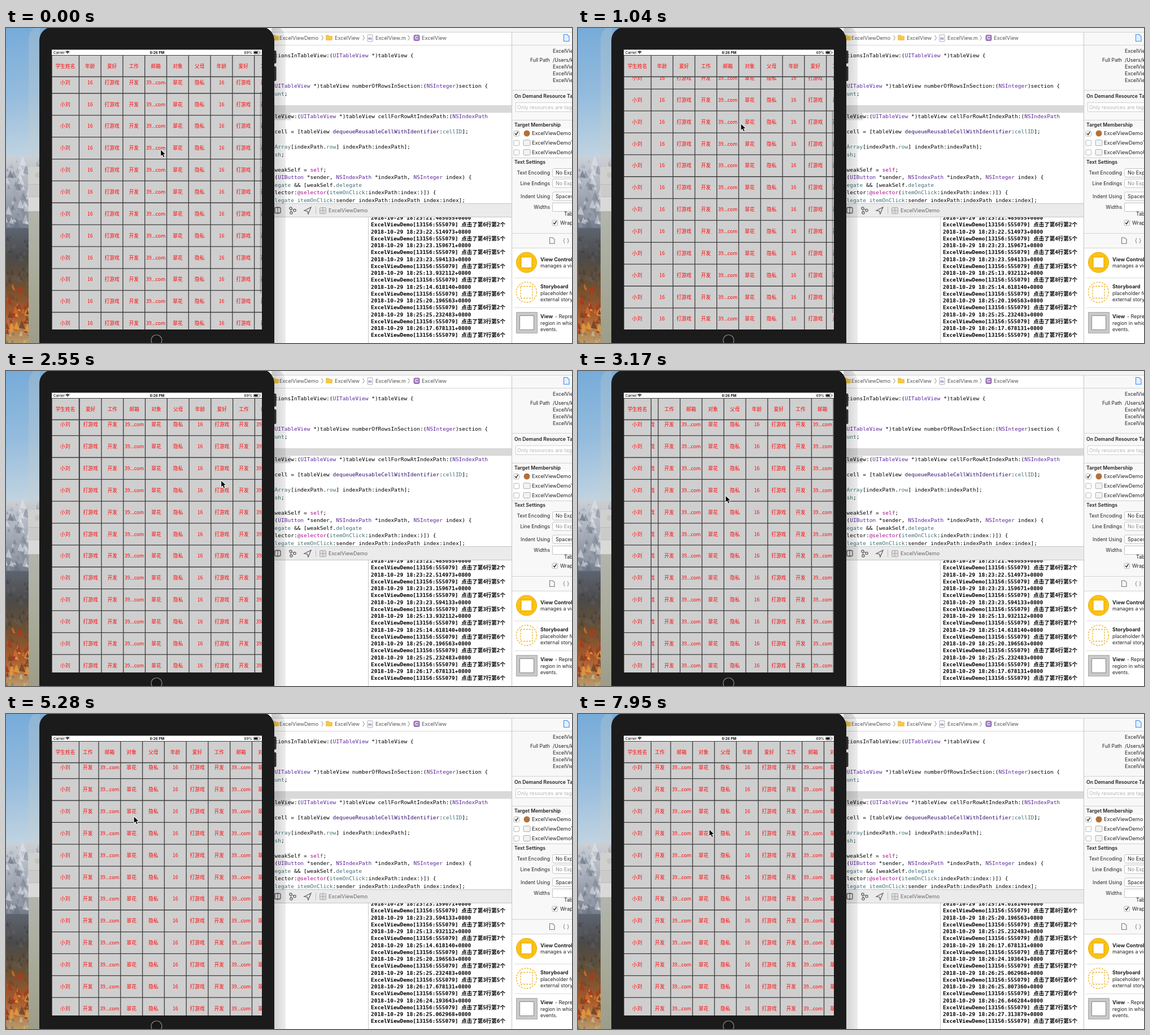
An HTML page with a canvas for the animation above (8000 ms loop, 1002 px wide and 559 px high).

```html
<!DOCTYPE html>
<html lang="en">
<head>
<meta charset="utf-8">
<title>Excel view demo</title>
<style>
html, body { margin: 0; width: 100%; height: 100%; overflow: hidden; background: #fff; }
canvas { display: block; width: 1002px; height: 559px; }
</style>
</head>
<body>
<canvas id="stage" width="1002" height="559"></canvas>
<script>
const ctx = document.getElementById('stage').getContext('2d');
const LOOP = 8000;
const SANS = 'Inter, sans-serif';
const CJK = '"Noto Sans CJK SC", sans-serif';
const MONO = '"DejaVu Sans Mono", "Noto Sans CJK SC", monospace';

// Each gesture starts where the last one ended; a click lands at its first step
const GESTURES = [
  { from: 140, to: 1040, x: 288, y: 169.5, sy: -46.5 },
  { from: 1220, to: 1810, x: 252, y: 188, sx: 13.3, sy: -40.2 },
  { from: 1960, to: 2160, x: 232, y: 191, sx: 38 },
  { from: 2370, to: 2550, x: 380.5, y: 194 },
  { from: 2730, to: 3170, x: 261, y: 221, sx: 65 },
  { from: 3350, to: 3350, sx: 81.7 },
  { from: 3500, to: 4090, x: 247, y: 138 },
  { from: 4380, to: 4830, x: 226, y: 181.5, click: true },
  { from: 5280, to: 5570, x: 224, y: 214, click: true },
  { from: 6020, to: 6460, x: 182, click: true },
  { from: 6760, to: 6910, y: 180, click: true },
  { from: 7510, to: 7950, x: 232, y: 204.5, click: true }];
const START = { x: 273.5, y: 215.5, sx: 0, sy: 0, clicks: 0 };

// time of a click, then its row and column
const LOG = ['18:23:21.485655 6 2', '18:23:22.514973 4 5', '18:23:23.159671 4 5',
  '18:23:23.594133 3 5', '18:25:13.932112 8 7', '18:25:14.618140 8 6', '18:25:20.196563 6 2',
  '18:25:25.232483 3 5', '18:26:17.678131 7 6', '18:26:24.193643 5 7', '18:26:25.062968 6 6',
  '18:26:25.807360 7 6', '18:26:26.646284 7 5', '18:26:27.313879 6 5'];

const COLUMNS = [['年龄', '16'], ['爱好', '打游戏'], ['工作', '开发'],
  ['邮箱', '39...com'], ['对象', '翠花'], ['父母', '隐私']];

const CODE = `tionsInTableView:(UITableView *)tableView {



UITableView *)tableView numberOfRowsInSection:(NSInteger)section {
unt;


leView:(UITableView *)tableView cellForRowAtIndexPath:(NSIndexPath

cell = [tableView dequeueReusableCellWithIdentifier:cellID];

Array[indexPath.row] indexPath:indexPath];
sh;

weakSelf = self;
(UIButton *sender, NSIndexPath *indexPath, NSInteger index) {
egate && [weakSelf.delegate
lector:@selector(itemOnClick:indexPath:index:)]) {
legate itemOnClick:sender indexPath:indexPath index:index];`.split('\n');
const SYNTAX = [
  [/^(UITableView|NSInteger|NSIndexPath|UIButton)$/, '#5c2699'],
  [/^(self|@selector)$/, '#aa0d91'],
  [/^dequeue/, '#2e0d6e'],
  [/^(cellID|Array|(de)?legate|egate|itemOnClick|row|unt|sh)$/, '#3f6e75']];
const colorOf = word => (SYNTAX.find(([rule]) => rule.test(word)) || [0, '#000'])[1];

function rect(x, y, w, h, color) { ctx.fillStyle = color; ctx.fillRect(x, y, w, h); }

function shape(path, fill, stroke, width = 1) {
  ctx.beginPath();
  path();
  if (fill) { ctx.fillStyle = fill; ctx.fill(); }
  if (stroke) { ctx.strokeStyle = stroke; ctx.lineWidth = width; ctx.stroke(); }
}
const round = (x, y, w, h, r, fill, stroke, width) =>
  shape(() => ctx.roundRect(x, y, w, h, r), fill, stroke, width);
const disc = (x, y, r, fill, stroke, width) =>
  shape(() => ctx.arc(x, y, r, 0, Math.PI * 2), fill, stroke, width);
const path = (points, stroke, width) =>
  shape(() => points.forEach(p => ctx.lineTo(...p)), null, stroke, width);
const poly = (points, fill, stroke, width) => shape(() => {
  points.forEach(p => ctx.lineTo(...p));
  ctx.closePath();
}, fill, stroke, width);
const hline = (x1, x2, y, color, width) => path([[x1, y], [x2, y]], color, width);
const vline = (x, y1, y2, color, width) => path([[x, y1], [x, y2]], color, width);

function gradient(x1, y1, x2, y2, ...colors) {
  const g = ctx.createLinearGradient(x1, y1, x2, y2);
  colors.forEach((c, i) => g.addColorStop(i / (colors.length - 1), c));
  return g;
}

// y is the optical middle of the line
function text(s, x, y, size, { color = '#222', family = SANS, weight = 400, align = 'left' } = {}) {
  ctx.font = `${weight} ${size}px ${family}`;
  ctx.fillStyle = color;
  ctx.textAlign = align;
  ctx.fillText(s, x, y + size * 0.36);
}

function clipped(x, y, w, h, draw) {
  ctx.save();
  ctx.beginPath();
  ctx.rect(x, y, w, h);
  ctx.clip();
  draw();
  ctx.restore();
}

// The screen refreshes about every 165 ms while a gesture lasts
function stateAt(t) {
  const state = { ...START };
  for (const g of GESTURES) {
    if (t < g.from) break;
    const steps = Math.round((g.to - g.from) / 165);
    const gap = (g.to - g.from) / steps;
    const done = steps ? Math.min(1, Math.floor((t - g.from) / gap + 1e-6) / steps) : 1;
    for (const key of ['x', 'y', 'sx', 'sy']) {
      if (key in g) state[key] += (g[key] - state[key]) * done;
    }
    if (g.click) state.clicks++;
  }
  return state;
}

function drawWallpaper() {
  let seed = 7;
  const random = () => (seed = seed * 16807 % 2147483647) / 2147483647;
  const scatter = (count, top, bottom, size, colors) => {
    for (let i = 0; i < count; i++) {
      const x = random() * 60, y = top + random() * (bottom - top), s = size * (.4 + random());
      poly([[x, y - s], [x + s * .8, y + s], [x - s * .6, y + s * .7]], colors[i % colors.length]);
    }
  };
  rect(0, 0, 80, 240, gradient(0, 0, 30, 235, '#76abd9', '#94bbdd', '#c3d5e1'));
  rect(0, 228, 80, 130, gradient(0, 228, 0, 358, '#ccd0d7', '#a5acb8', '#737b8a'));
  scatter(90, 236, 350, 7, ['rgba(232,234,238,.5)', 'rgba(96,104,122,.4)', 'rgba(160,164,175,.5)']);
  rect(0, 355, 80, 204, gradient(0, 355, 0, 559, '#5d6470', '#4b4a4a', '#6a5033', '#a8592a', '#b99a6a'));
  scatter(60, 365, 455, 5, ['rgba(100,98,98,.4)', 'rgba(50,54,54,.4)']);
  scatter(70, 458, 540, 6, ['#c8682a', '#d9953f', '#7a4a28', '#a53c20']);
  scatter(20, 540, 559, 4, ['#c9b084', '#8a7a62']);

  round(39.5, 246, 40, 79, [5, 0, 0, 0], '#dfdfdf');
  round(39.5, 246, 40, 31, [5, 0, 0, 0], '#d3d2d3');
  disc(56, 261, 5, '#c0bfc0');
  rect(40, 277, 20, 22, '#cccccc');
  hline(40, 60, 277.5, '#b4b4b4');
  hline(40, 60, 299.5, '#b4b4b4');
  rect(40, 325, 20, 234, gradient(0, 325, 0, 559, '#a9aca2', '#9c9d89', '#8c8a73'));
}

function folder(x) {
  round(x - 6, 12.5, 6, 4, 1, '#e9b93f');
  round(x - 6, 14, 12, 8, 1, '#f3c84e');
}
const chevron = x => path([[x - 1.5, 13], [x + 1.5, 17.5], [x - 1.5, 22]], '#888');

function drawEditor() {
  rect(470, 0, 426, 559, '#fff');
  rect(470, 0, 532, 7, '#f3f3f3');
  hline(470, 1002, 7.5, '#d2d2d2');
  hline(470, 895, 30.5, '#d6d6d6');
  const crumb = (s, x) => text(s, x, 17.5, 9.1, { color: '#555' });
  folder(477);
  crumb('ExcelViewDemo', 484);
  chevron(560);
  folder(572);
  crumb('ExcelView', 582);
  chevron(633);
  round(640, 12, 9, 12, 1, '#fff', '#aaa');
  text('m', 644.5, 18.5, 7, { color: '#7a4fb0', weight: 600, align: 'center' });
  crumb('ExcelView.m', 654);
  chevron(713);
  round(722, 12.5, 10, 10, 2, '#a983c4', '#8b62ab');
  text('C', 727, 17.5, 8, { color: '#fff', weight: 600, align: 'center' });
  crumb('ExcelView', 736);

  rect(470, 137, 425, 13.5, '#d9d9d9');
  rect(470, 150.5, 34, 13, '#dcdcdc');
  clipped(470, 31, 425, 280, () => {
    ctx.font = `9.5px ${MONO}`;
    ctx.textAlign = 'left';
    const advance = ctx.measureText('m').width;
    CODE.forEach((source, row) => {
      let x = 475.6;
      for (const word of source.split(/(@?\w+)/)) {
        ctx.fillStyle = colorOf(word);
        ctx.fillText(word, x, 52.4 + row * 13.5);
        x += word.length * advance;
      }
    });
  });
}

function drawDebugBar() {
  rect(470, 311, 425, 25, '#ebebeb');
  hline(470, 895, 311.5, '#c6c6c6');
  hline(470, 895, 335.5, '#c6c6c6');
  const ink = '#5b5b5b';
  round(476, 318.5, 10, 10, 2, null, ink, 1.3);
  vline(481, 317, 330, ink);
  const nodes = [[511, 323.5], [504, 320], [505, 328]];
  path(nodes, ink);
  for (const [x, y] of nodes) disc(x, y, 2.2, '#ebebeb', ink, 1.2);
  poly([[528, 324], [540, 318], [535, 330], [533.5, 325]], null, ink, 1.2);
  vline(548.5, 317, 330, '#bdbdbd');
  round(555.5, 318.5, 11, 11, 1.5, '#ddd', '#aaa');
  vline(561, 318, 330, '#aaa');
  hline(555, 567, 324, '#aaa');
  text('ExcelViewDemo', 571, 323.5, 9.1, { color: '#666' });
}

function drawConsole(clicks) {
  vline(641.5, 336, 559, '#c8c8c8');
  const style = { family: MONO, weight: 700, color: '#000' };
  clipped(642, 336, 253, 223, () => {
    LOG.slice(clicks, clicks + 9).forEach((entry, i) => {
      const [time, row, column] = entry.split(' ');
      const y = 336.75 + i * 24.5;
      text(`2018-10-29 ${time}+0800`, 646, y, 9.5, style);
      text(`ExcelViewDemo[13156:555079] 点击了第${row}行第${column}个`, 646, y + 12.25, 9.5, style);
    });
  });
}

function checkbox(x, y, checked) {
  round(x - 4.5, y - 4.5, 9.5, 9.5, 2, '#fff', '#b5b5b5');
  if (checked) path([[x - 2.5, y], [x - .5, y + 2.5], [x + 3, y - 3]], '#333', 1.4);
}

// Page with a folded corner
const page = (x, y, w, h, fill, stroke) =>
  poly([[x, y], [x + w * .6, y], [x + w, y + h * .3], [x + w, y + h], [x, y + h]], fill, stroke, 1.1);

function drawInspector() {
  const label = (s, y) => text(s, 963, y, 8.7, { align: 'right' });
  const heading = (s, y) => text(s, 900, y, 8.7, { weight: 600 });
  rect(895, 8, 107, 551, '#f8f8f8');
  vline(895.5, 8, 559, '#c4c4c4');
  for (const y of [30.5, 110.5, 163.5, 230.5, 364.5, 390.5]) hline(896, 1002, y, '#d4d4d4');
  page(987.5, 11.5, 9.5, 12, '#e4f0ff', '#3b8cf0');
  label('Full Path', 57);
  text('ExcelView', 968, 41, 8.9);
  text('/Users/k', 968, 57, 8.9);
  for (let y = 69; y < 100; y += 11.7) text('ExcelView', 968, y, 8.9);

  heading('On Demand Resource Tags', 120.5);
  round(902.5, 132.5, 110, 16, 0, '#fff', '#d0d0d0');
  text('Only resources are taggable', 905, 140.5, 9, { color: '#b4b4b4' });

  heading('Target Membership', 171.5);
  rect(899, 179, 103, 49, '#fff');
  ['ExcelViewDemo', 'ExcelViewDemoTests', 'ExcelViewDemoUITests'].forEach((name, i) => {
    const y = 187 + i * 16.8;
    checkbox(903.5, y, i === 0);
    if (i) round(916, y - 5, 12, 10, 1.5, '#f3f3f3', '#aaa');
    else disc(922, y, 5.5, '#b5703a');
    text(name, 931, y, 9.1);
  });

  heading('Text Settings', 238);
  const setting = (name, value, y, color) => {
    label(name, y);
    round(967.5, y - 7.5, 60, 15, value ? 3 : 0, '#fff', '#c4c4c4');
    text(value, 973, y, 9, { color });
  };
  setting('Text Encoding', 'No Explicit', 257);
  setting('Line Endings', 'No Explicit', 275.5, '#8a8a8a');
  setting('Indent Using', 'Spaces', 298.5);
  setting('Widths', '', 318);
  text('Tab', 988, 330, 8.7);
  checkbox(971.5, 345.5, true);
  text('Wrap lines', 981, 345.5, 9);
  page(962.5, 372, 8.5, 10.5, null, '#777');
  text('{ }', 991.5, 377, 10, { color: '#777', align: 'center' });
  drawLibrary();
}

function drawLibrary() {
  rect(896, 391, 106, 168, '#fff');
  hline(900, 1002, 443.5, '#dcdcdc');
  hline(900, 1002, 496.5, '#dcdcdc');
  disc(921.5, 416, 18, '#fdc413', '#e2a90c');
  rect(913, 407.5, 17, 17, '#fff');
  ctx.setLineDash([3, 2]);
  round(910.5, 405, 22, 22, 0, null, '#e0a50a');
  disc(921.5, 469, 18, null, '#e9b32a', 1.3);
  round(911, 458.5, 21, 21, 0, null, '#e9b32a', 1.3);
  ctx.setLineDash([]);
  round(903.5, 504.5, 37, 37, 0, '#c9c9c9', '#a9a9a9');
  round(909.5, 510.5, 25, 25, 0, '#fff', '#888');
  const item = (y, title, ...lines) => {
    text(title, 946, y, 9, { weight: 700 });
    lines.forEach((s, i) => text(s, 946, y + (i + 1) * 11.4, 8.8));
  };
  item(410.5, 'View Controller', 'manages a view');
  item(459, 'Storyboard', 'placeholder for', 'external story');
  item(512, 'View', 'region in which', 'events.');
  text('- Represents', 972, 512, 8.8);
}

function drawDevice() {
  // Translucent frame around the body, pale over the desktop and shaded over the editor
  const halo = color => round(40, -6, 455, 600, 26, color);
  clipped(0, 0, 60, 559, () => halo('rgba(200,203,198,.28)'));
  clipped(470, 0, 40, 559, () => halo(gradient(475, 0, 495, 0, 'rgba(0,0,0,.17)', 'rgba(0,0,0,.07)')));
  round(470, 40, 8.5, 23, 2, '#2e2e2e');
  round(470, 68, 8.5, 26, 2, '#2e2e2e');
  round(59, -2, 416, 620, 24, '#1b1b1b');
  disc(266.5, 554, 9.5, '#171717', '#8d8d8d', 1.2);

  rect(81, 38.5, 372, 10, '#fff');
  const dark = { color: '#111', weight: 500 };
  text('Carrier', 84, 43.5, 6, dark);
  for (let r = 1.2; r < 5; r += 1.8) {
    shape(() => ctx.arc(109, 46, r, -Math.PI * .75, -Math.PI * .25), null, '#111', 1.2);
  }
  text('6:26 PM', 267.5, 43.5, 6.3, { color: '#111', weight: 700, align: 'center' });
  text('69%', 436, 43.5, 6.3, { ...dark, align: 'right' });
  round(438.5, 41, 10.5, 5, 1, '#fff', '#444', .7);
  rect(439.3, 41.8, 6.3, 3.4, '#111');
  rect(449.8, 42.5, 1, 2, '#444');
}

function drawTable({ sx, sy }, t) {
  const ROW = 38.85, COL = 38.78, LEFT = 129.4, TOP = 86.5, INK = '#3c3c3c';
  const red = { color: '#ff0808', family: CJK, align: 'center' };
  const cell = (s, x, y) => text(s, x, y, 8.7, red);
  const shift = ((29.5 + sy) % ROW + ROW) % ROW;
  const rows = Array.from({ length: 13 }, (_, i) => TOP + shift + (i - 1) * ROW);

  rect(81, 48.5, 372, 486.5, '#cfcfcf');
  clipped(81, TOP, 372, 448.5, () => {
    for (const y of rows) {
      hline(81, 453, y, INK, 1.3);
      cell('小刘', 104.7, y + ROW / 2);
    }
  });
  clipped(LEFT, 48, 323.6, 487, () => {
    for (let i = 0; i < 12; i++) {
      const x = LEFT + i * COL - sx;
      const [title, value] = COLUMNS[i % COLUMNS.length];
      vline(x, 48, 535, INK, 1.3);
      cell(title, x + COL / 2, 68);
      clipped(LEFT, TOP, 323.6, 448.5, () => rows.forEach(y => cell(value, x + COL / 2, y + ROW / 2)));
    }
  });
  cell('学生姓名', 105, 68);
  hline(81, 453, 48.5, INK);
  hline(81, 453, TOP, INK, 1.3);
  vline(81.4, 48, 535, INK, .8);
  vline(LEFT, 48, 535, INK, 1.3);
  if (t < 1220) round(449.8, 113 - sy * .75, 1.8, 358, 1, 'rgba(0,0,0,.28)');
}

function drawPointer({ x, y }) {
  ctx.save();
  ctx.translate(x, y);
  ctx.lineJoin = 'round';
  const arrow = [[.7, 1], [.7, 11.6], [3.3, 9.2], [5.1, 13.7], [6.8, 13], [4.9, 8.6], [8.4, 8.6]];
  poly(arrow, null, '#fff', 1.8);
  poly(arrow, '#000');
  ctx.restore();
}

function frame(now) {
  const t = now % LOOP;
  const state = stateAt(t);
  drawWallpaper();
  drawEditor();
  drawDebugBar();
  drawConsole(state.clicks);
  drawInspector();
  drawDevice();
  drawTable(state, t);
  drawPointer(state);
  requestAnimationFrame(frame);
}
frame(performance.now());
</script>
</body>
</html>
```
